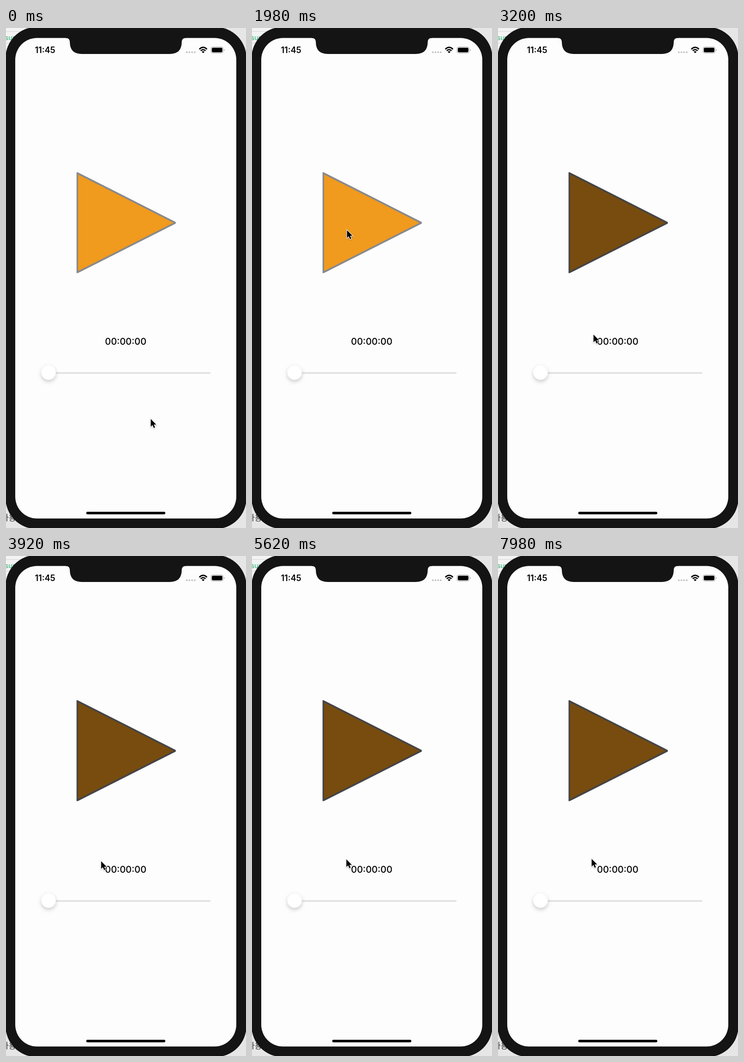
An HTML page that plays this animation: 519x1078 px, repeating every 8 s.

```html
<!DOCTYPE html>
<html>
<head>
<meta charset="utf-8">
<style>
  html, body { margin: 0; width: 100%; height: 100%; overflow: hidden; background: #e6e6e7; }
  svg { display: block; width: 519px; height: 1078px; }
  text { font-family: Inter, Roboto, sans-serif; }
</style>
</head>
<body>
<svg viewBox="0 0 519 1078">
  <defs>
    <clipPath id="button"><rect x="152.5" y="311" width="214.7" height="217.5"/></clipPath>
    <filter id="thumbShadow" x="-50%" y="-50%" width="200%" height="220%">
      <feDropShadow dx="0" dy="4" stdDeviation="4" flood-opacity=".2"/>
    </filter>
    <filter id="cursorShadow" x="-50%" y="-50%" width="200%" height="200%">
      <feDropShadow dx="0" dy="1" stdDeviation="1" flood-opacity=".35"/>
    </filter>
  </defs>

  <!-- window behind the phone -->
  <path d="M0 0H70V70H0Z" fill="#f3f3f3"/>
  <path d="M0 7.5H40M0 32.5H16" stroke="#d4d4d4"/>
  <text x="-2" y="26" font-size="14" fill="#25ad70">sur</text>
  <text x="-10" y="1062" font-size="17" fill="#333" style="font-family:'Noto Sans CJK KR','Noto Sans CJK',sans-serif">사용</text>

  <!-- phone -->
  <rect x="-1" y="-2" width="521" height="1082" rx="67" fill="#141414"/>
  <rect x="20" y="21.5" width="478" height="1036" rx="47" fill="#fdfdfd"/>
  <path d="M129 21H389V21.5Q380 21.5 380 30Q380 56 354 56H164Q138 56 138 30Q138 21.5 129 21.5Z" fill="#141414"/>

  <!-- status bar -->
  <text x="62.5" y="54" font-size="18" font-weight="600">11:45</text>
  <path d="M391 52.2h17.5" stroke="#c4c4c4" stroke-width="4" stroke-linecap="round" stroke-dasharray="0 5.7"/>
  <g fill="none" stroke="#000" stroke-width="2.7">
    <path d="M418 45.7Q426.3 37.7 434.6 45.7"/>
    <path d="M421 49Q426.3 44.2 431.6 49"/>
  </g>
  <path d="M423.2 51.2Q426.3 48.6 429.4 51.2L426.3 54.3Z"/>
  <rect x="443.2" y="40.7" width="26.6" height="13.6" rx="4" fill="none" stroke="#a5a5a5"/>
  <rect x="445" y="42.5" width="23" height="10" rx="2.4"/>
  <path d="M471.3 45.2q3.2 2.3 0 4.6z" fill="#a5a5a5"/>

  <!-- player -->
  <path id="play" d="M154 312.7L366.5 420L154 527Z" stroke-width="3.8" clip-path="url(#button)"/>
  <text x="258.8" y="683" font-size="20" font-weight="500" text-anchor="middle">00:00:00</text>
  <rect x="78" y="742" width="364.5" height="3.4" rx="1.7" fill="#e1e1df"/>
  <circle cx="92" cy="742.7" r="15.6" fill="#fff" stroke="#eee" stroke-width=".5" filter="url(#thumbShadow)"/>
  <rect x="173.5" y="1043" width="171" height="5.4" rx="2.7"/>

  <path id="cursor" d="M0 0V16.4L3.8 12.9L6.6 19.2L9.3 18L6.6 11.9H11.8Z" stroke="#fff" stroke-width="2"
    paint-order="stroke" filter="url(#cursorShadow)"/>
</svg>
<script>
  const LOOP = 8000, PRESS = 2480;
  // time, x, y of the pointer tip
  const path = [
    [0, 313, 843], [1000, 223, 526], [1700, 205.5, 436], [PRESS, 205.5, 436],
    [3200, 206.5, 661], [4640, 205, 655], [6700, 203, 653], [LOOP, 202.5, 653]
  ];
  const play = document.getElementById('play');
  const cursor = document.getElementById('cursor');

  function pointer(t) {
    const i = path.findIndex(key => key[0] > t);
    const [t0, x0, y0] = path[i - 1], [t1, x1, y1] = path[i];
    const u = (t - t0) / (t1 - t0), k = u * u * (3 - 2 * u);
    return [x0 + (x1 - x0) * k, y0 + (y1 - y0) * k];
  }

  function draw(now) {
    const t = now % LOOP, pressed = t >= PRESS;
    play.setAttribute('fill', pressed ? '#784c0e' : '#f09a1e');
    play.setAttribute('stroke', pressed ? '#444446' : '#89898c');
    cursor.setAttribute('transform', `translate(${pointer(t)})`);
    requestAnimationFrame(draw);
  }
  draw(0);
</script>
</body>
</html>
```
